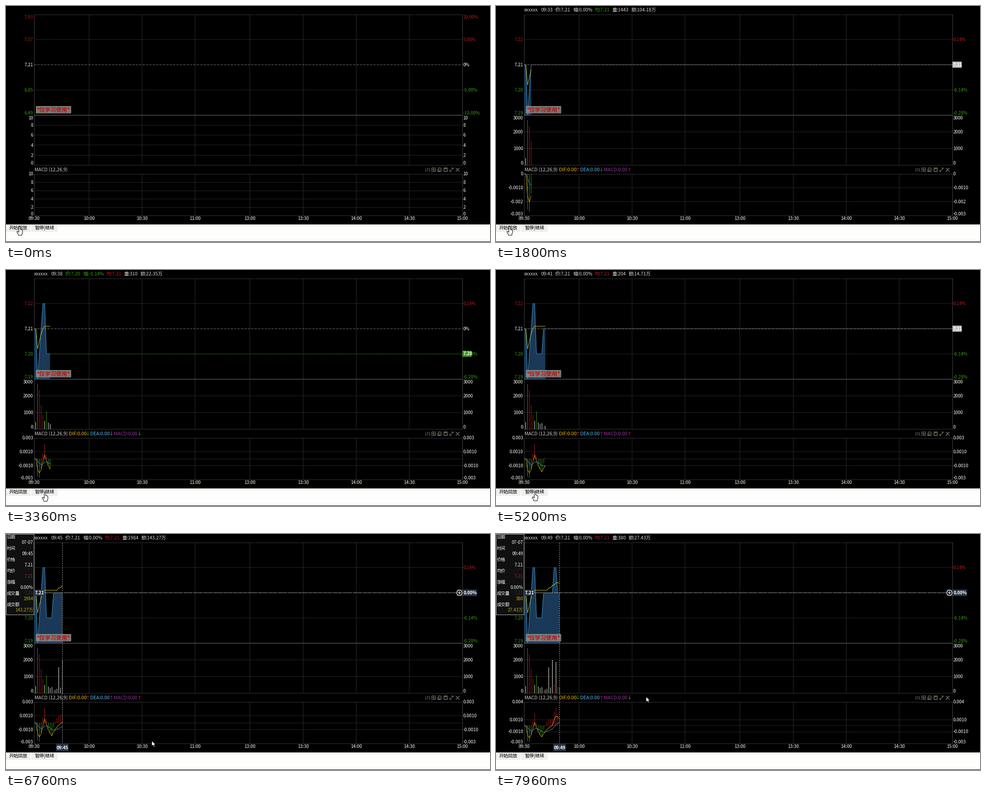
A matplotlib script that plays this animation: 1069 by 524 pixels, repeating every 8 s.

```python
import math

import matplotlib.pyplot as plt
import numpy as np
from matplotlib.animation import FuncAnimation
from matplotlib.patches import Polygon, Rectangle, Circle

W, H = 1069, 524
STEP, LOOP = 40, 8000
LEFT, RIGHT = 62, 1008
PRICE, VOLUME, MACD = (19, 242), (242, 353.5), (373, 465.5)

plt.rcParams["font.family"] = "Noto Sans CJK JP"
plt.rcParams["toolbar"] = "None"

RED, GREEN, WHITE = "#b41a1a", "#38960f", "#f0f0ec"
GRID, GRID_ROW, FRAME, SLATE = "#2b2b29", "#252521", "#45454c", "#263242"
SKY, GOLD, YELLOW, PURPLE = "#48a0d4", "#f2b80c", "#d8d02c", "#9a30a4"

# One value per minute, starting with the opening auction.
BASE = 7.21
ticks = np.array([0, 0, -2, -1, 0, 1, 1, -1, -1, -1, -1,
                  0, 0, 0, 0, 0, 0, 1, 1, 0, 0])
price = BASE + ticks / 100
average = BASE + np.array([0, 0, -8, -5, -2, 0] + [1] * 8
                          + [2, 2, 3, 3, 4, 4, 4]) / 1000
volume = [25, 425, 2700, 2320, 1443, 870, 500, 1060, 390, 310, 370,
          180, 204, 260, 1545, 340, 1984, 530, 1870, 370, 380]
amount = {4: 104.18, 9: 22.35, 16: 143.27, 20: 27.43}


def ema(values, span):
    out = [values[0]]
    for v in values[1:]:
        out.append(out[-1] + (v - out[-1]) * 2 / (span + 1))
    return np.array(out)


dif = ema(ticks / 100, 12) - ema(ticks / 100, 26)
dea = ema(dif, 9)
hist = 2 * (dif - dea)

fig = plt.figure(figsize=((W + 1e-3) / 72, (H + 1e-3) / 72), dpi=72,
                 facecolor="black")
ax = fig.add_axes([0, 0, 1, 1])
ax.set_xlim(0, W)
ax.set_ylim(H, 0)
ax.set_autoscale_on(False)
ax.axis("off")
live = []


def keep(artist):
    live.append(artist)
    return artist


def line(xs, ys, color, z=3, lw=1, **kw):
    keep(ax.plot(xs, ys, color=color, lw=lw, zorder=z, snap=False,
                 solid_capstyle="butt", dash_capstyle="butt", **kw)[0])


def pixel(v):
    """Centre of the pixel that holds v, for crisp one pixel lines."""
    return math.floor(v + 1e-6) + 0.5


def row(y, x0, x1, color, **kw):
    line([x0, x1], [pixel(y)] * 2, color, **kw)


def column(x, y0, y1, color, **kw):
    line([pixel(x)] * 2, [y0, y1], color, **kw)


def text(x, y, s, color=WHITE, size=10, ha="left", z=6, **kw):
    keep(ax.text(x, y + 0.5 + 0.37 * size, s, color=color, fontsize=size, ha=ha,
                 va="baseline", zorder=z, **kw))


def box(x0, y0, x1, y1, color, z=7, edge="none", **kw):
    keep(ax.add_patch(Rectangle((x0, y0), x1 - x0, y1 - y0, facecolor=color,
                                edgecolor=edge, lw=1, zorder=z, snap=False, **kw)))


def time_x(i):
    return LEFT + np.asarray(i) * (RIGHT - LEFT) / 242


def scale(pane, low, high):
    top, bottom = pane
    return lambda v: bottom - (np.asarray(v) - low) / (high - low) * (bottom - top)


def tint(v, neutral=WHITE):
    return neutral if abs(v) < 1e-7 else RED if v > 0 else GREEN


def clock(i):
    return f"09:{29 + i:02d}"


def level(y, left, right, color=WHITE, at=None):
    """Grid line with a label at both ends."""
    row(y, LEFT, RIGHT, GRID_ROW, z=1)
    at = y if at is None else at
    text(60, at, left, color, ha="right")
    text(1009.5, at, right, color)


def draw_icons():
    c, y = "#85857c", 363.5
    for x, k in ((927, 1), (931, -1), (935, 1)):
        column(x, y - 4, y + 4, "#62625c")
        row(y + 2 * k, x - 1, x + 2, "#62625c")
    box(940.5, y - 4, 944.5, y, "none", 3, c)
    box(944.5, y, 948.5, y + 4, "none", 3, c)
    line([946, 948.5, 948.5], [y - 4, y - 4, y - 1], c)
    line([943, 940.5, 940.5], [y + 4, y + 4, y + 1], c)
    line([955.5, 959.5, 961.5, 961.5, 955.5, 955.5],
         [y - 4, y - 4, y - 2, y + 3, y + 3, y - 4], c)
    line([953.5, 953.5, 959.5], [y - 2, y + 4, y + 4], c)
    row(y, 957, 960, c)
    box(967.5, y - 4, 974.5, y + 4, "none", 3, "#a8a888")
    row(y - 2, 969, 973, "#a8a888")
    line([981, 987], [y + 3, y - 3], c)
    line([984.5, 987.5, 987.5], [y - 4, y - 4, y - 1], c)
    line([980.5, 980.5, 983.5], [y + 1, y + 4, y + 4], c)
    for k in (1, -1):
        line([993.5, 1001.5], [y - 4 * k, y + 4 * k], "#a0a09c")


def draw_static():
    marks = {0: "09:30", 31: "10:00", 61: "10:30", 91: "11:00", 122: "13:00",
             152: "13:30", 182: "14:00", 212: "14:30", 242: "15:00"}
    for i, label in marks.items():
        x = float(time_x(i))
        text(x, 470.5, label, ha="center")
        for top, bottom in ((19, 354), (373, 466)):
            column(x, top, bottom, FRAME if i in (0, 242) else GRID, z=1)
    for y in (19, 353, 373, 465):
        row(y, LEFT, RIGHT, "#35353a", z=1.5)
    row(242, LEFT, RIGHT, "#555a70", z=2, lw=1.4)
    row(130, LEFT, RIGHT, "#77778c", z=2, dashes=(4, 3.5))
    text(63, 362.5, "MACD (12,26,9)", "#d0d0cc", 10.5)
    draw_icons()
    box(66, 222, 144, 238.5, "#8e8e8a", z=5, alpha=0.85)
    text(105, 230, "*仅学习使用*", "#b41414", 12.4, "center", weight="bold")
    box(0, 485, W, H, "#fdfdfb", z=1)
    box(0, 523, W, H, "black", z=2)
    for x0, x1, label in ((0, 53.5, "开始回放"), (57, 113, "暂停|继续")):
        box(x0, 485.5, x1, 500.5, "#f0f0ee", z=3, edge="#e6e6e3")
        text((x0 + x1) / 2, 492, label, "black", 10.3, "center")


def price_axis(span):
    fmt = scale(PRICE, BASE - span, BASE + span)
    for k in (2, 1, 0, -1, -2):
        if k == 2 and span < 0.1:
            continue
        v = span * k / 2
        pct = 5 * k if span > 0.1 else v / BASE * 100
        y = float(fmt(BASE + v))
        label = f"{pct:.2f}%" if k else "0%"
        level(y, f"{BASE + v:.2f}", label, tint(v),
              y - 0.5 + {2: 5, -2: -5}.get(k, 0))
    return fmt


def volume_axis(top, labels):
    fmt = scale(VOLUME, 0, top)
    for v in labels:
        y = float(fmt(v))
        shift = 6 if v == top else -5 if v == 0 else 0
        level(y, str(v), str(v), at=y - 0.5 + shift)
    return fmt


def macd_axis(low, high, labels):
    fmt = scale(MACD, low, high)
    for v, label in labels:
        y = float(fmt(v))
        level(y, label, label, at=y - (5 if v == low else 1))
    if low < 0 < high:
        row(float(fmt(0)), LEFT, RIGHT, GRID_ROW, z=1)
    return fmt


def macd_scale(i):
    if i == 1:
        return macd_axis(-1.2, 1.2, [(v, f"{v:.2f}") for v in (1.2, .4, -.4, -1.2)])
    # The scale works in thousandths.
    values = np.concatenate([dif[:i + 1], dea[:i + 1], hist[:i + 1]]) * 1000
    high, low = math.ceil(values.max()), math.floor(values.min())
    steps = range(low, high + 1) if high < 2 else (low, -1, 1, high)
    names = {0: "0", 1: "0.0010", -1: "-0.0010"}
    fmt = macd_axis(low, high, [(v, names.get(v, f"{v / 1000:.3f}")) for v in steps])
    return lambda v: fmt(np.asarray(v) * 1000)


def draw_header(i):
    change = price[i] - BASE
    mean = average[i] - BASE
    cost = amount.get(i, volume[i] * price[i] / 100)
    pct = change / BASE * 100
    shift = 4 if change < -1e-6 else 0
    grey = "#d2d2ce"
    vol_x = 257 + shift
    items = [(62, "xxxxxx", grey), (99, clock(i), grey),
             (131, f"价:{price[i]:.2f}", tint(change, grey)),
             (170, f"幅:{pct:.2f}%", tint(change, grey)),
             (218 + shift, f"均:{average[i]:.2f}", tint(mean, grey)),
             (vol_x, f"量:{volume[i]}", grey),
             (vol_x + 18 + 6 * len(str(volume[i])), f"额:{cost:.2f}万", grey)]
    for x, s, color in items:
        text(x, 7.5, s, color, 10.4)
    return cost, pct


def draw_indicator_title(i):
    series = (("DIF", dif, GOLD), ("DEA", dea, "#52b8f0"), ("MACD", hist, PURPLE))
    starts, arrows = (139, 186, 238), (180, 232, 294)
    if i == 1:
        starts, arrows = (139, 177, 219), (168, 211, 264)
    for x, at, (name, data, color) in zip(starts, arrows, series):
        move = data[i] - data[i - 1]
        text(x, 362.5, name + (":0" if i == 1 else ":0.00"), color, 10.5)
        arrow = "→" if i == 1 else "↑" if move > 0 else "↓"
        text(at, 362.5, arrow, tint(move), 10, "center", weight="bold")


def draw_series(i, price_y, volume_y, macd_y):
    n = i + 1
    xs = time_x(np.arange(n))
    ys = price_y(price[:n])
    keep(ax.fill(np.r_[xs, xs[-1], xs[0]], np.r_[ys, 242, 242],
                 color="#1a3958", lw=0, zorder=1.5)[0])
    line(xs, ys, SKY, lw=0.9)
    line(xs, price_y(average[:n]), YELLOW, z=4, lw=0.9)
    zero = float(macd_y(0))
    for k, x in enumerate(xs):
        move = ticks[k] - ticks[k - 1] if k else 0
        column(x, 353.5, float(volume_y(volume[k])), tint(move))
        if abs(hist[k]) > 1e-9:
            column(x, zero, float(macd_y(hist[k])), tint(hist[k]))
    line(xs, macd_y(dif[:n]), GOLD, z=4, lw=0.8)
    line(xs, macd_y(dea[:n]), SKY, z=4, lw=0.8)


def draw_last_price(i, y):
    change = price[i] - BASE
    color = tint(change, "#c0c0c0")
    row(y, float(time_x(i)), RIGHT, color, dashes=(2, 2))
    box(1008, y - 7, 1028.5, y + 6.5, color)
    text(1009, y - 1, f"{price[i]:.2f}", "white", 9.8, z=8, weight="bold")


def draw_crosshair(i, y, pct):
    x, y = pixel(time_x(i)), pixel(y)
    column(x, 19, 465, "#a0a0a0", z=4, dashes=(3, 2))
    row(y, LEFT, RIGHT, "#a0a0a0", z=4, dashes=(9, 2))
    box(x - 14, 466, x + 13.5, 482, SLATE)
    text(x, 473.5, clock(i), "white", 9.8, "center", z=8, weight="bold")
    box(LEFT, y - 7, 83, y + 7, SLATE, z=22)
    text(63, y - 1, f"{price[i]:.2f}", "white", 9.8, z=23, weight="bold")
    box(995, y - 7.5, 1040.5, y + 7.5, SLATE, z=9)
    keep(ax.add_patch(Circle((1001.5, y), 5.8, facecolor="black",
                             edgecolor="white", lw=1.3, zorder=10)))
    row(y, 998, 1005, "white", z=11, lw=1.3)
    column(1001.5, y - 3.5, y + 3.5, "white", z=11, lw=1.3)
    text(1010.5, y - 0.5, f"{pct:.2f}%", "white", 9.8, z=11, weight="bold")


def draw_tooltip(i, cost, pct):
    box(0.5, 0.5, 62, 179.5, "#141414", z=18, alpha=0.84)
    box(0.5, 0.5, 62, 179.5, "none", z=19, edge="#b4b4b4")
    change = price[i] - BASE
    rows = [("日期", "07-07", WHITE), ("时间", clock(i), WHITE),
            ("价格", f"{price[i]:.2f}", tint(change)),
            ("均价", f"{average[i]:.2f}", tint(average[i] - BASE)),
            ("涨幅", f"{pct:.2f}%", tint(change)),
            ("成交量", str(volume[i]), "#b4a818"),
            ("成交额", f"{cost:.2f}万", "#b4a818")]
    for k, (name, value, color) in enumerate(rows):
        text(1.5, 5.5 + 25 * k, name, WHITE, 9.6, z=20)
        text(60, 18 + 25 * k, value, color, 9.8, "right", z=20)


def draw_chart(i, hover):
    if i == 0:
        price_axis(0.72)
        volume_axis(10, range(0, 11, 2))
        macd_axis(0, 10, [(v, str(v)) for v in range(0, 11, 2)])
        return
    price_y = price_axis(0.72 if i == 1 else 0.02)
    if i == 1:
        volume_y = volume_axis(500, (0, 200, 500))
    else:
        volume_y = volume_axis(3000, range(0, 3001, 1000))
    cost, pct = draw_header(i)
    draw_indicator_title(i)
    draw_series(i, price_y, volume_y, macd_scale(i))
    y = float(price_y(price[i]))
    if hover:
        draw_crosshair(i, y, pct)
        draw_tooltip(i, cost, pct)
    else:
        draw_last_price(i, y)


def bar_index(ms):
    if ms < 840:
        return 0
    if ms < 5200:
        return 1 + min(10, max(0, (ms - 846) // 314))
    return 12 + (ms - 5200) // 320


def pointer(ms):
    """Tip of the mouse pointer."""
    x, y = 30, 489
    for start, end, tx, ty in ((2840, 3240, 86, 493.5), (4120, 4360, 86, 492.5),
                               (5440, 6040, 322, 459), (6880, 7640, 331.5, 361)):
        u = min(1, max(0, (ms - start) / (end - start)))
        u = u * u * (3 - 2 * u)
        x, y = x + (tx - x) * u, y + (ty - y) * u
    return x, y


HAND = np.array([(-1.5, 1), (0, 0), (1.5, 1), (1.5, 7), (3, 6.8), (4.2, 8),
                 (5.8, 8.6), (6.6, 10), (6.6, 14), (5.2, 17), (5, 20), (-2.5, 20),
                 (-3, 17.5), (-6, 13), (-5.5, 11.3), (-4, 11.3), (-1.5, 13.5)])
ARROW = np.array([(0, 0), (0, 12), (2.8, 9.6), (4.8, 14), (6.8, 13),
                  (4.9, 9), (8.5, 8.6)])

draw_static()
live.clear()
cursor = ax.add_patch(Polygon(HAND, facecolor="white", edgecolor="black",
                              lw=1, zorder=30))
shown = None


def update(frame):
    global shown
    ms = frame * STEP
    x, y = pointer(ms)
    hover = y < 485
    state = bar_index(ms), hover
    if state != shown:
        while live:
            live.pop().remove()
        draw_chart(*state)
        shown = state
    cursor.set_xy((ARROW if hover else HAND) + (x, y))
    return [cursor]


anim = FuncAnimation(fig, update, frames=LOOP // STEP, interval=STEP,
                     init_func=lambda: update(0), repeat=True,
                     repeat_delay=0, blit=False)
plt.show()
```
